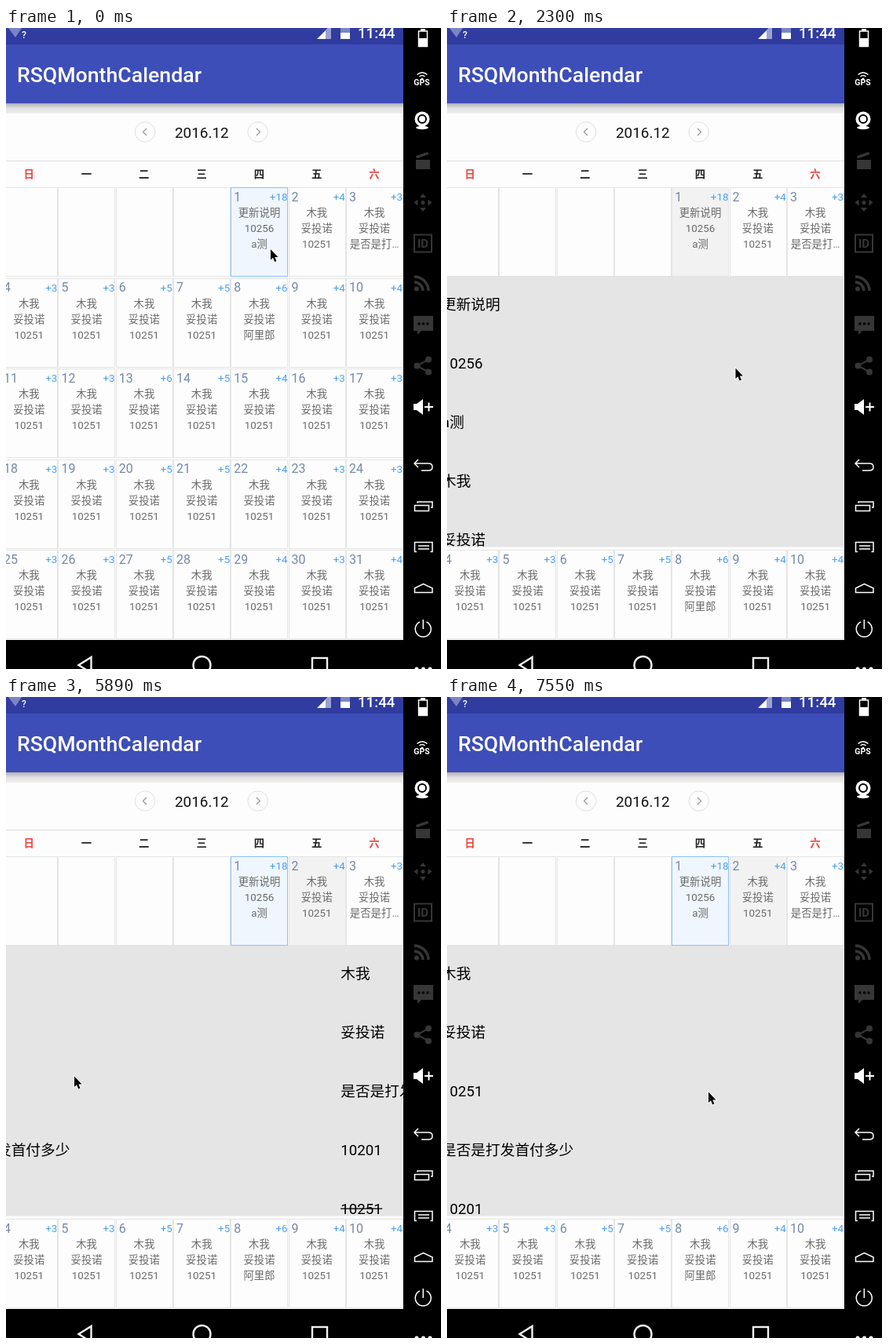
Animation of 554 by 817 pixels, one loop 8000 ms. Source, as an HTML page with a canvas:

```html
<!DOCTYPE html>
<html lang="zh-CN">
<head>
<meta charset="utf-8">
<style>
html, body { margin: 0; width: 100%; height: 100%; overflow: hidden; background: #000; }
svg, canvas { position: absolute; left: 0; top: 0; }
canvas { top: 202px; }
text { font-family: Roboto, "Noto Sans CJK SC", "Noto Sans CJK", sans-serif; }
.dots { stroke-linecap: round; }
</style>
</head>
<body>
<svg width="554" height="817" fill="none">
  <defs>
    <linearGradient id="shade" x2="0" y2="1">
      <stop stop-color="#b0b0b4"/><stop offset=".5" stop-color="#e2e2e2"/><stop offset="1" stop-color="#efefef"/>
    </linearGradient>
  </defs>
  <rect width="506" height="780" fill="#fdfdfd"/>
  <rect width="506" height="22" fill="#303c9f"/>
  <rect y="21" width="506" height="75" fill="#3e4eb8"/>
  <rect y="96" width="506" height="13" fill="url(#shade)"/>
  <path d="M0 169.5H506" stroke="#dcdcdc"/>

  <!-- status bar -->
  <path d="M3 0H20L12 12ZM426 0H438V6H426Z" fill="#7c85c3"/>
  <path d="M414 -4V14H396ZM426 6H438V14H426Z" fill="#fff"/>
  <path d="M407 3L414 -4V14H407Z" fill="#9aa1d2"/>
  <g fill="#fff" font-weight="500">
    <text x="20" y="13" font-size="12">?</text>
    <text x="448" y="13" font-size="18.7">11:44</text>
    <text x="14" y="69" font-size="26.7">RSQMonthCalendar</text>
  </g>

  <!-- month header -->
  <g stroke="#e0e0e0"><circle cx="177" cy="132.5" r="12.7"/><circle cx="320.7" cy="132.5" r="12.7"/></g>
  <path d="M179 128L174.5 132.5L179 137M319 128L323.5 132.5L319 137" stroke="#999" stroke-width="1.3"/>
  <text x="249.3" y="140" font-size="18.9" text-anchor="middle" fill="#111">2016.12</text>
  <g id="week" font-size="13.4" font-weight="700" text-anchor="middle"></g>

  <!-- navigation bar -->
  <g stroke="#f2f2f2" stroke-width="2.4">
    <path d="M108.5 802V822L92.500 812Z"/><circle cx="249.5" cy="812" r="11"/><rect x="390" y="803" width="19" height="19"/>
  </g>

  <!-- tool strip, bright icons -->
  <g fill="#fff">
    <path d="M528 1H534V4H528ZM526 13H536V23H526Z"/>
    <text x="529.5" y="73" font-size="10.5" font-weight="700" text-anchor="middle">GPS</text>
    <circle cx="530" cy="65" r="1.5"/>
    <circle cx="530" cy="116" r="9.5"/><ellipse cx="530" cy="127" rx="8" ry="2.2"/>
    <path d="M519 479H523L531 473V493L523 487H519Z"/>
  </g>
  <path d="M533 483H544M538.5 477.5V488.5" stroke="#fff" stroke-width="2"/>
  <path class="dots" d="M523 817H541" stroke="#fff" stroke-width="5" stroke-dasharray="0 8.5"/>
  <circle cx="530" cy="116" r="5" stroke="#000" stroke-width="2"/>
  <g stroke="#fff" stroke-width="1.5">
    <rect x="525.5" y="4" width="11" height="19.5"/>
    <path d="M526.5 62Q530 59 533.5 62M523.5 59.5Q530 54 536.5 59.5"/>
    <path d="M525 550L520 555L525 560M520 555H538Q543 555 543 559.5T538 564H529"/>
    <path d="M520.5 608.5H538.5V615.5H520.5ZM524 605.5V604H543V611H541"/>
    <path d="M523 667.5H520.5V655.5H543V667.5H540.5M525 660H539M525 664H539"/>
    <path d="M520.5 719.5V714L531.5 708.5L543 714V719.5Z"/>
    <path d="M527 757A10 10 0 1 0 535.5 757M531.3 754V766"/>
  </g>

  <!-- tool strip, dim icons -->
  <g fill="#363636">
    <path d="M522 168H540V180H522ZM522 163L537 158L538.5 161L523 166.5Z"/>
    <path id="arrow" d="M531 211L535 216H527Z"/>
    <use href="#arrow" transform="rotate(90 531 222.5)"/>
    <use href="#arrow" transform="rotate(180 531 222.5)"/>
    <use href="#arrow" transform="rotate(270 531 222.5)"/>
    <circle cx="531" cy="222.5" r="2.5"/>
    <text x="531" y="280" font-size="15" font-weight="700" text-anchor="middle">ID</text>
    <circle cx="523" cy="332.5" r="3"/>
    <path d="M519 367H544V386H529L524 391V386H519Z"/>
    <circle cx="523.5" cy="430.5" r="4"/><circle cx="538" cy="422.5" r="4"/><circle cx="538" cy="438.5" r="4"/>
  </g>
  <g stroke="#363636" stroke-width="2">
    <rect x="520" y="263.5" width="22" height="22"/>
    <path d="M520 324A11 11 0 0 1 531 335M520 317A18 18 0 0 1 538 335" stroke-width="3.5"/>
    <path d="M538 422.5L523.5 430.5L538 438.5"/>
  </g>
  <path class="dots" d="M526 377H538" stroke="#000" stroke-width="3.4" stroke-dasharray="0 5.5"/>
</svg>
<canvas id="stage" width="506" height="578"></canvas>
<script>
const ctx = document.getElementById('stage').getContext('2d');
const FONT = 'Roboto, "Noto Sans CJK SC", "Noto Sans CJK", sans-serif';
const LOOP = 8000, PAGE = 513, COL = 73.3, ROW = 115.5, LEFT = -6.9, TOP = 203;
const PANEL_TOP = 316.5, OPEN = 346.5, TAP = 1440;

document.getElementById('week').innerHTML = [...'日一二三四五六'].map((d, i) =>
  `<text x="${29.2 + COL * i}" y="191" fill="${i % 6 ? '#222' : '#ea4740'}">${d}</text>`).join('');

// "+n" label of each weekday, with the few days that have more
const usual = '3355433', busy = { 1: 18, 2: 4, 8: 6, 9: 4, 10: 4, 13: 6, 31: 4 };
const lists = [
  ['更新说明', '10256', 'a测', '木我', '妥投诺'],
  ['木我', '妥投诺', '10251', '是否是打发首付多少', '10201'],
  ['木我', '妥投诺', '是否是打发首付多少', '10201', '10251']
];
const preview = { 1: lists[0], 3: ['木我', '妥投诺', '是否是打…'], 8: ['木我', '妥投诺', '阿里郎'] };

const linear = p => p;
const easeOut = p => 1 - (1 - p) ** 1.9;
const easeInOut = p => p < 0.5 ? 2 * p * p : 1 - 2 * (1 - p) ** 2;
const sine = p => (1 - Math.cos(Math.PI * p)) / 2;

// Eased progress from 0 to 1 between two times
const go = (t, start, end, ease) => ease(Math.max(0, Math.min(1, (t - start) / (end - start))));

// The panel already shows 54 px when the tap registers
const openShift = t => t < TAP ? 0 : OPEN * go(t, 1329, 1760, sine);

// Pages scrolled: a slow drag in two parts, a flick on, a flick back
const pageAt = t => 0.616 * go(t, 3130, 3910, easeOut) + 0.384 * go(t, 3910, 4650, easeOut)
  + go(t, 5698, 6390, easeInOut) - go(t, 6990, 7550, easeInOut);

// Pointer strokes: start, end, dx, dy
const strokes = [[1940, 2300, 30.5, 151.5], [3130, 3600, -107.5, 0], [3600, 4300, -141, 23],
  [5130, 5420, 151, 27], [5710, 5890, -183, 0], [5890, 6390, 11, 0], [6990, 7300, 235, 20]];

const pointerAt = t => strokes.reduce(([x, y], [start, end, dx, dy]) => {
  const p = go(t, start, end, linear);
  return [x + dx * p, y + dy * p];
}, [337, 282]);

function label(str, x, y, size, color, align = 'left') {
  ctx.font = `${size}px ${FONT}`;
  ctx.fillStyle = color;
  ctx.textAlign = align;
  ctx.fillText(str, x, y);
}

function cell(col, y, day, selected) {
  const x = LEFT + COL * col, today = day === 1 && !selected;
  ctx.fillStyle = selected ? '#f2f2f2' : today ? '#f0f6fe' : '#fdfdfd';
  ctx.fillRect(x, y, 72.3, 113.7);
  ctx.strokeStyle = today ? '#8cc0f5' : '#e4e4e4';
  ctx.lineWidth = 1;
  ctx.strokeRect(Math.round(x) + 0.5, Math.round(y) + 0.5, 72, 113);
  if (day < 1) return;
  label(day, x + 4, y + 17.5, 16, '#7488a8');
  label('+' + (busy[day] || usual[col]), x + 72.2, y + 17.2, 13.4, '#4b9ff2', 'right');
  (preview[day] || lists[1]).slice(0, 3).forEach((s, i) =>
    label(s, x + 36.2, y + 37 + 20.2 * i, 13.4, '#6a6a6a', 'center'));
}

function drawList(n, offset) {
  const x = offset - 7;
  if (Math.abs(offset) >= PAGE) return;
  lists[n].forEach((s, i) => label(s, x, 359 + 74.9 * i, 18.7, '#000'));
  if (n === 2) ctx.fillRect(x, 651.5, 53, 1.3);
}

function pointer(x, y) {
  const arrow = new Path2D('M0 0V13.5L3 10.800L5.200 16L7.500 15L5.300 10H9.500Z');
  ctx.translate(x, y);
  ctx.strokeStyle = '#fff';
  ctx.lineWidth = 1.6;
  ctx.stroke(arrow);
  ctx.fillStyle = '#000';
  ctx.fill(arrow);
}

function draw(t) {
  const shift = openShift(t), page = pageAt(t);
  const picked = shift ? 1 + Math.round(page) : 0;

  ctx.setTransform(1, 0, 0, 1, 0, -202);
  ctx.fillStyle = '#fdfdfd';
  ctx.fillRect(0, 202, 506, 578);
  if (shift) {
    ctx.fillStyle = '#e5e5e5';
    ctx.fillRect(0, PANEL_TOP, 506, 345);
    if (t < TAP + 60) label('加载中', 253, 492, 14, '#7488a8', 'center');
    else lists.forEach((_, n) => drawList(n, (n - page) * PAGE));
  }
  for (let i = 0; i < 35; i++) {
    const row = Math.floor(i / 7), day = i - 3;
    cell(i % 7, TOP + ROW * row + (row ? shift : 0), day, day > 0 && day === picked);
  }
  pointer(...pointerAt(t));
}

const begin = performance.now();
function tick() {
  draw((performance.now() - begin) % LOOP);
  requestAnimationFrame(tick);
}
tick();
</script>
</body>
</html>
```
